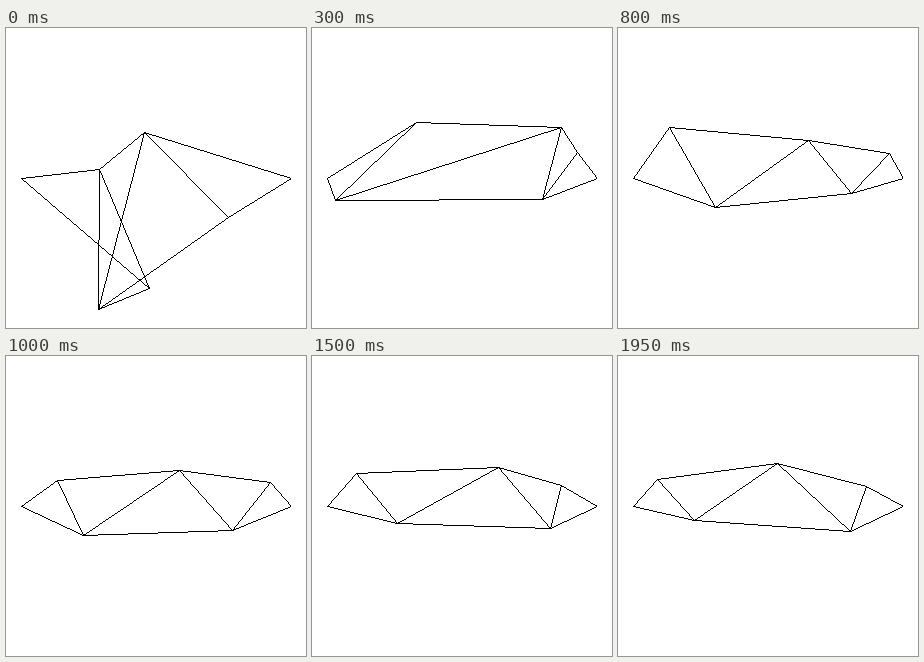
These frames come from a looping animation (300 by 300 pixels, 2050 ms). An HTML page with a canvas:

```html
<!DOCTYPE html>
<html lang="en">
<head>
<meta charset="utf-8">
<title>Truss shape search</title>
<style>
html, body { margin: 0; width: 100%; height: 100%; overflow: hidden; background: #fff; }
canvas { display: block; image-rendering: pixelated; }
</style>
</head>
<body>
<canvas id="stage" width="300" height="300"></canvas>
<script>
const ctx = document.getElementById('stage').getContext('2d');
const STEP = 50, LAST = 1950, LOOP = 2050;
const LEFT = [15, 150], RIGHT = [285, 150];

// Key poses of the five free joints, from left to right
const POSES = [
  { at: 0, free: [[143, 260], [93, 141], [92, 281], [138, 104], [222, 189]] },
  { at: 300, free: [[104, 94], [23, 172], [249, 99], [230, 171], [265, 124]] },
  { at: 500, free: [[70, 99], [100, 215], [195, 95], [210, 166], [263, 125]] },
  { at: 800, free: [[51, 99], [97, 179], [190, 112], [233, 165], [271, 125]] },
  { at: 1200, free: [[51, 127], [74, 179], [170, 114], [225, 175], [263, 126]] },
  { at: 1500, free: [[44, 117], [85, 167], [186, 111], [238, 172], [249, 129]] },
  { at: LAST, free: [[39, 123], [76, 164], [159, 107], [232, 175], [248, 130]] }
];

const easeOut = p => 1 - (1 - p) ** 3;
const mix = (a, b, p) => Math.round(a + (b - a) * p);

function jointsAt(time) {
  const next = Math.max(1, POSES.findIndex(pose => pose.at >= time));
  const a = POSES[next - 1], b = POSES[next];
  const part = easeOut((time - a.at) / (b.at - a.at));
  const free = a.free.map(([x, y], i) => [mix(x, b.free[i][0], part), mix(y, b.free[i][1], part)]);
  return [LEFT, ...free, RIGHT];
}

// One-pixel line without smoothing; the end pixel stays open.
function line([x1, y1], [x2, y2]) {
  const dx = x2 - x1, dy = y2 - y1;
  const n = Math.max(Math.abs(dx), Math.abs(dy));
  for (let i = 0; i < n; i++) {
    ctx.fillRect(Math.round(x1 + dx * i / n), Math.round(y1 + dy * i / n), 1, 1);
  }
}

function draw(now) {
  const time = Math.min(LAST, Math.floor(now % LOOP / STEP) * STEP);
  const joints = jointsAt(time);
  ctx.fillStyle = '#fff';
  ctx.fillRect(0, 0, 300, 300);
  ctx.fillStyle = '#000';
  // Each joint is tied to the next two.
  joints.forEach((p, i) => joints.slice(i + 1, i + 3).forEach(q => line(p, q)));
}

const start = performance.now();
function tick() {
  draw(performance.now() - start);
  requestAnimationFrame(tick);
}
tick();
</script>
</body>
</html>
```
